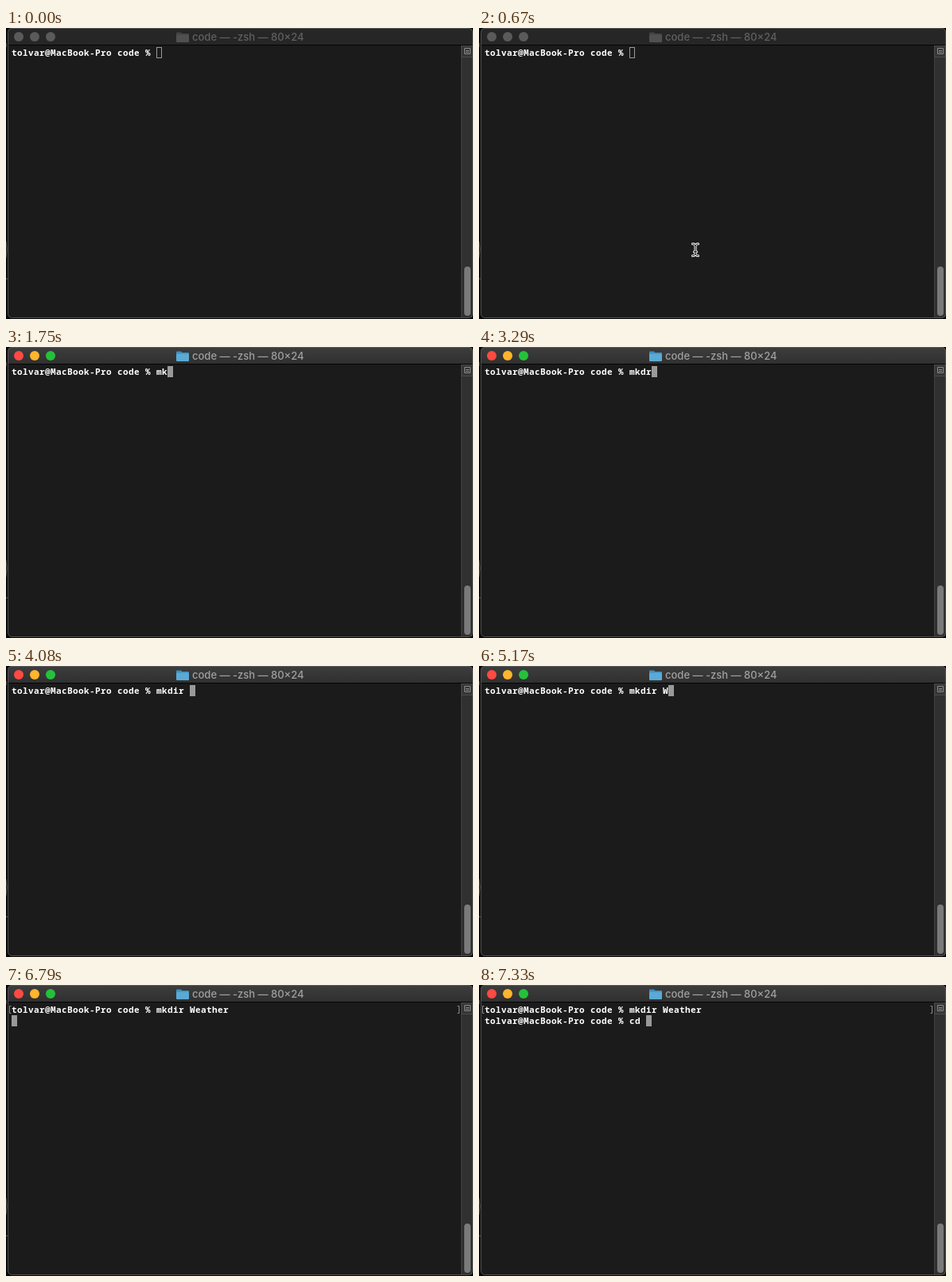
An HTML page that plays this animation: 587 by 366 pixels, repeating every 8 s.

```html
<!DOCTYPE html>
<html lang="en">
<head>
<meta charset="utf-8">
<title>Terminal</title>
<style>
  html, body { margin: 0; width: 100%; height: 100%; overflow: hidden; background: #000; }
  svg { display: block; width: 587px; height: 366px; }
  text { white-space: pre; }
  .mono { font: 600 11px "Noto Sans Mono", monospace; letter-spacing: .4px; fill: #fff; font-variant-ligatures: none; }
  .title { font: 500 13px Inter, sans-serif; }
</style>
</head>
<body>
<svg viewBox="0 0 587 366" xmlns="http://www.w3.org/2000/svg">
  <defs>
    <linearGradient id="bar" x2="0" y2="1">
      <stop offset="0" stop-color="#3d3d3d"/>
      <stop offset="1" stop-color="#303030"/>
    </linearGradient>
  </defs>

  <rect width="587" height="366" fill="#060606"/>
  <path d="M0 19v5" stroke="#777"/>
  <path d="M0 268q2 10 0 21M0 315.500h2" stroke="#555" fill="none"/>

  <rect x="2" y="0" width="585" height="365" rx="5" fill="#1b1b1b"/>
  <path id="head" d="M2 21V5a5 5 0 0 1 5-5H582a5 5 0 0 1 5 5V21z"/>
  <path d="M2 21.500H587" stroke="#050505"/>

  <g id="lights"></g>
  <g id="folder">
    <path id="tab" d="M214 8V6.500a1 1 0 0 1 1-1h5l1.500 1.500H229a1 1 0 0 1 1 1V9H214z"/>
    <rect id="flap" x="214" y="8.500" width="16" height="9.500" rx="1"/>
  </g>
  <text id="title" class="title" x="234" y="16">code — -zsh — 80×24</text>

  <rect x="572" y="22" width="14" height="342" fill="#303030"/>
  <path d="M572.500 22V364" stroke="#424242"/>
  <rect x="572.500" y="22.500" width="14" height="14" fill="#363636" stroke="#4b4b4b"/>
  <path d="M576.500 25.500h7v7h-7zM578 28.500h4M578 30.500h4" fill="none" stroke="#8a8a8a"/>
  <rect x="576" y="300" width="8" height="62" rx="4" fill="#7a7a7a"/>
  <rect x="2.500" y=".5" width="584" height="364" rx="5" fill="none" stroke="#5b5b5b" stroke-opacity=".85"/>

  <path id="marks" d="M6.500 26.500h-2v9h2M567.500 26.500h2v9h-2" fill="none" stroke="#8c8c8c"/>
  <rect id="caret"/>
  <text id="row0" class="mono" x="7" y="35"></text>
  <text id="row1" class="mono" x="7" y="49"></text>

  <g id="mouse" fill="none" stroke-linecap="round">
    <path d="M-3.500-7.500q3 0 3.500 2.500q.5-2.500 3.500-2.500M0-5V5M-3.500 7.500q3 0 3.500-2.500q.5 2.500 3.500 2.500M-1.500 2.500h3" stroke="#fff" stroke-width="3"/>
    <path d="M-3.500-7.500q3 0 3.500 2.500q.5-2.500 3.500-2.500M0-5V5M-3.500 7.500q3 0 3.500-2.500q.5 2.500 3.500 2.500M-1.500 2.500h3" stroke="#000"/>
  </g>
</svg>
<script>
const LOOP = 8000, CELL = 7, LEFT = 7, TOP = 24, LINE = 14;
const PROMPT = 'tolvar@MacBook-Pro code % ';
const ENTER = 6790, READY = 6830, ACTIVE = 710, FILLED = 750, HIDE = 1670;

// [time, key]; '<' is backspace
const KEYS = [
  [1580, 'm'], [1750, 'k'], [2080, 'd'], [2250, 'r'], [2580, 'i'],
  [3290, '<'], [3420, '<'], [3830, 'i'], [3920, 'r'], [4080, ' '],
  [5170, 'W'], [5380, 'e'], [5500, 'a'], [5670, 't'], [5790, 'h'], [5880, 'e'], [5960, 'r']
];
const NEXT = [[7170, 'c'], [7250, 'd'], [7330, ' ']];

const $ = id => document.getElementById(id);
const set = (el, attrs) => { for (const k in attrs) el.setAttribute(k, attrs[k]); };
const typed = (keys, t) => keys.reduce((s, [at, k]) =>
  t < at ? s : k === '<' ? s.slice(0, -1) : s + k, '');

const lights = ['#ff4a43', '#ffb52c', '#25c13a'].map((color, i) => {
  const dot = document.createElementNS('http://www.w3.org/2000/svg', 'circle');
  set(dot, { cx: 16 + 20 * i, cy: 11, r: 6 });
  $('lights').append(dot);
  return { dot, color };
});

function drawChrome(on) {
  set($('head'), { fill: on ? 'url(#bar)' : '#262626' });
  set($('title'), { fill: on ? '#a0a0a0' : '#606060' });
  set($('tab'), { fill: on ? '#3f8fbe' : '#444' });
  set($('flap'), { fill: on ? '#5aaad5' : '#505050' });
  lights.forEach(({ dot, color }) => set(dot, { fill: on ? color : '#5a5a5a' }));
}

function drawCaret(col, row, solid) {
  const x = LEFT + col * CELL, y = TOP + row * LINE;
  set($('caret'), solid
    ? { x, y, width: 7, height: 14, fill: '#999', stroke: 'none' }
    : { x: x + .5, y: y + .5, width: 6, height: 13, fill: 'none', stroke: '#999' });
}

function drawMouse(t) {
  const step = Math.floor((t - 460) / 42) * 42;
  const rest = (1 - Math.min(1, Math.max(0, step / 210))) ** 2;
  set($('mouse'), {
    transform: `translate(${272 + 22 * rest} ${279 + 84 * rest})`,
    visibility: t >= 460 && t < HIDE ? 'visible' : 'hidden'
  });
}

function draw(t) {
  const first = PROMPT + typed(KEYS, t);
  const second = t < READY ? '' : PROMPT + typed(NEXT, t);
  const row = t < ENTER ? 0 : 1;
  $('row0').textContent = first;
  $('row1').textContent = second;
  set($('marks'), { visibility: row ? 'visible' : 'hidden' });
  drawChrome(t >= ACTIVE);
  drawCaret((row ? second : first).length, row, t >= FILLED);
  drawMouse(t);
}

const start = performance.now();
function tick(now) {
  draw(Math.max(0, now - start) % LOOP);
  requestAnimationFrame(tick);
}
draw(0);
requestAnimationFrame(tick);
</script>
</body>
</html>
```
